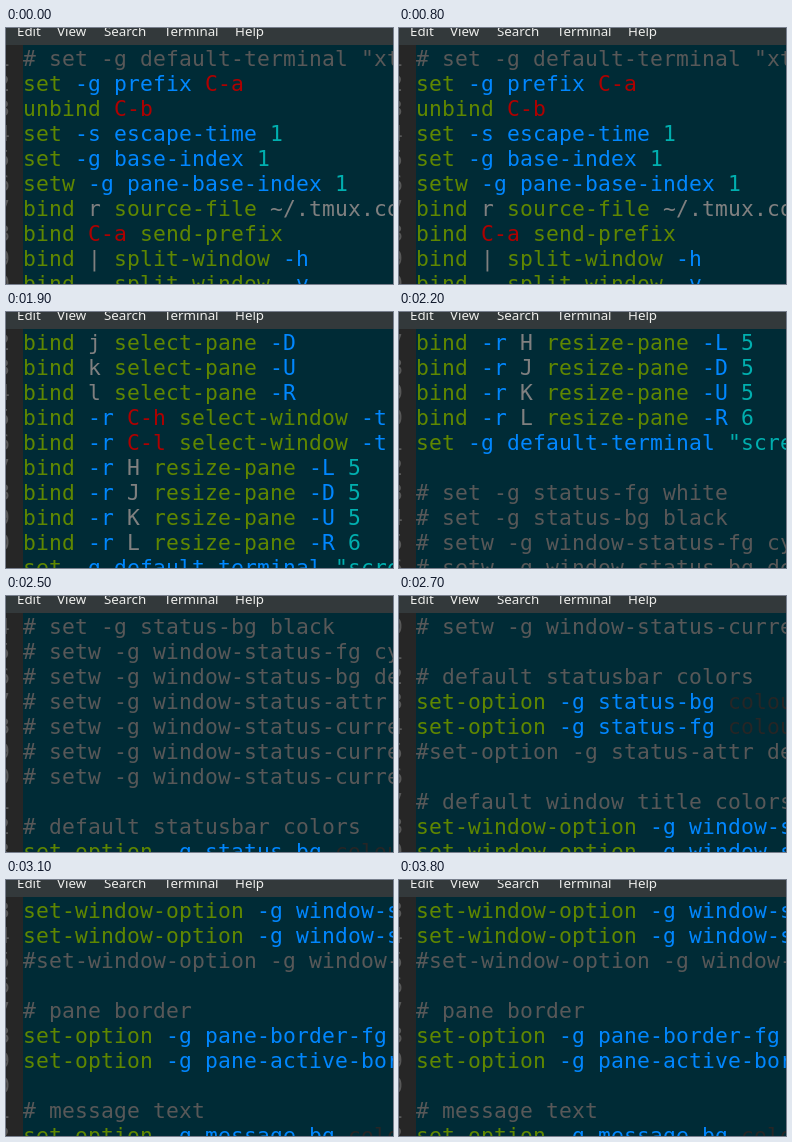
An HTML page with a canvas for the animation above (5000 ms loop, 387 by 256 pixels).

```html
<!DOCTYPE html>
<html lang="en">
<head>
<meta charset="utf-8">
<title>Scrolling a tmux configuration</title>
<style>
html, body { margin: 0; width: 100%; height: 100%; overflow: hidden; background: #002b36; }
canvas { display: block; }
</style>
</head>
<body>
<canvas id="stage" width="387" height="256"></canvas>
<script>
const ctx = document.getElementById('stage').getContext('2d');
const LOOP = 5000, CELL = 13, ROW = 25, LEFT = 17, TOP = 18;
const color = {
  back: '#002b36', gutter: '#262626', comment: '#585858', plain: '#808080',
  command: '#5f8700', option: '#0087ff', key: '#af0000', value: '#00afaf'
};

const lines = `# set -g default-terminal "xterm-256color"
set -g prefix C-a
unbind C-b
set -s escape-time 1
set -g base-index 1
setw -g pane-base-index 1
bind r source-file ~/.tmux.conf
bind C-a send-prefix
bind | split-window -h
bind - split-window -v
bind h select-pane -L
bind j select-pane -D
bind k select-pane -U
bind l select-pane -R
bind -r C-h select-window -t :-
bind -r C-l select-window -t :+
bind -r H resize-pane -L 5
bind -r J resize-pane -D 5
bind -r K resize-pane -U 5
bind -r L resize-pane -R 6
set -g default-terminal "screen-256color"

# set -g status-fg white
# set -g status-bg black
# setw -g window-status-fg cyan
# setw -g window-status-bg default
# setw -g window-status-attr dim
# setw -g window-status-current-fg white
# setw -g window-status-current-bg red
# setw -g window-status-current-attr bright

# default statusbar colors
set-option -g status-bg colour235
set-option -g status-fg colour136
#set-option -g status-attr default

# default window title colors
set-window-option -g window-status-fg colour244
set-window-option -g window-status-bg default
#set-window-option -g window-status-attr dim

# active window title colors
set-window-option -g window-status-current-fg colour166
set-window-option -g window-status-current-bg default
#set-window-option -g window-status-current-attr bright

# pane border
set-option -g pane-border-fg colour235
set-option -g pane-active-border-fg colour240

# message text
set-option -g message-bg colour235`.split('\n');

// [start time, first visible line]
const scroll = [
  [0, 1], [1500, 3], [1600, 5], [1700, 8], [1800, 10], [1900, 12], [2000, 14],
  [2200, 17], [2300, 19], [2400, 22], [2500, 24], [2600, 27], [2700, 30],
  [2800, 33], [2900, 37], [3000, 40], [3100, 43]
];
// [start time, cursor row], -1 when hidden
const cursor = [
  [0, -1], [100, 0], [200, 1], [300, 2], [400, 3], [600, 5], [700, 6], [800, -1]
];
const menu = [['Edit', 11], ['View', 51], ['Search', 98], ['Terminal', 158], ['Help', 229]];

const valueAt = (steps, t) => steps.findLast(([start]) => t >= start)[1];

function rect(fill, x, y, w, h) {
  ctx.fillStyle = fill;
  ctx.fillRect(x, y, w, h);
}

function wordColor(word, column, line) {
  if (line[0] === '#') return color.comment;
  if (column === 0) return color.command;
  if (/^C-/.test(word)) return color.key;
  if (/^-\w/.test(word)) return color.option;
  if (/^[\d"]/.test(word)) return color.value;
  if (/^colour/.test(word)) return color.gutter;
  if (!line.startsWith('bind')) return color.option;
  return /^[a-z]{2}/.test(word) ? color.command : color.plain;
}

function drawText(text, column, row, fill) {
  ctx.fillStyle = fill;
  [...text].forEach((char, i) =>
    ctx.fillText(char, LEFT + (column + i) * CELL, TOP + row * ROW + 20));
}

function drawMenu() {
  rect('#33393b', 0, 0, 387, 17);
  ctx.font = '13.33px "Noto Sans", "Open Sans", sans-serif';
  ctx.fillStyle = '#eeeeec';
  for (const [label, x] of menu) ctx.fillText(label, x, 8);
}

function drawPointer() {
  rect('#d0d0d0', 294, 74, 1, 18);
  rect('#d0d0d0', 291, 73, 7, 1);
  rect('#d0d0d0', 291, 92, 7, 1);
}

function draw(t) {
  rect(color.back, 0, 0, 387, 256);
  rect(color.gutter, 0, 17, LEFT, 239);
  ctx.font = '21.33px "DejaVu Sans Mono", monospace';
  const first = valueAt(scroll, t);
  for (let row = 0; row < 10; row++) {
    const number = first + row;
    const line = lines[number - 1] ?? '';
    drawText(String(number % 10), -2, row, color.comment);
    for (const { 0: word, index } of line.matchAll(/\S+/g)) {
      drawText(word, index, row, wordColor(word, index, line));
    }
  }
  const row = valueAt(cursor, t);
  if (row >= 0) {
    rect(color.plain, LEFT, TOP + row * ROW, CELL, ROW);
    drawText(lines[first - 1 + row][0], 0, row, color.back);
  }
  if (t >= 3700 && t < 3800) drawPointer();
  drawMenu();
}

function tick() {
  draw(performance.now() % LOOP);
  requestAnimationFrame(tick);
}
tick();
</script>
</body>
</html>
```
